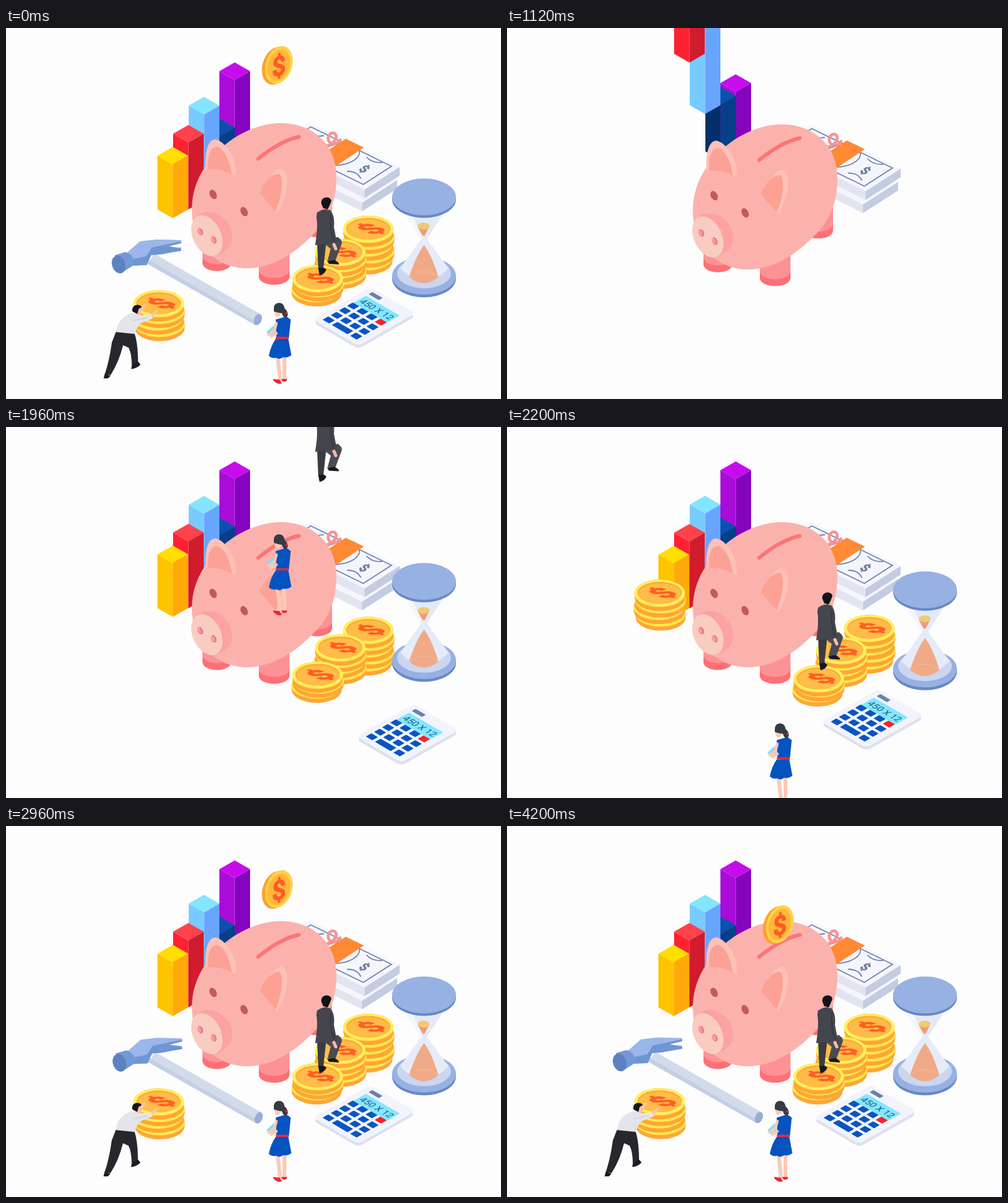
Animation of 791 by 593 pixels, one loop 4680 ms. Source, as an HTML page:

```html
<!DOCTYPE html>
<html lang="en">
<head>
<meta charset="utf-8">
<title>Savings</title>
<style>
html, body { margin: 0; width: 100%; height: 100%; overflow: hidden; background: #fdfdfe; }
svg { display: block; width: 791px; height: 593px; }
text { text-anchor: middle; font-family: Roboto, "Liberation Sans", sans-serif; font-weight: 700; }
</style>
</head>
<body>
<svg id="stage" viewBox="0 0 791 593"></svg>
<script>
const path = (fill, d) => `<path fill="${fill}" d="${d}"/>`;
const poly = (fill, pts) => `<polygon fill="${fill}" points="${pts}"/>`;
const line = (color, width, d) =>
  `<path fill="none" stroke="${color}" stroke-width="${width}" stroke-linecap="round" d="${d}"/>`;
const oval = (fill, x, y, rx, ry, turn = 0) =>
  `<ellipse fill="${fill}" rx="${rx}" ry="${ry}" transform="translate(${x} ${y}) rotate(${turn})"/>`;
const rect = (fill, x, y, w, h) => `<rect fill="${fill}" x="${x}" y="${y}" width="${w}" height="${h}" rx="1"/>`;
const dollar = (color, size, matrix, weight = 0) =>
  `<text fill="${color}" stroke="${color}" stroke-width="${weight}" font-size="${size}" y="${size * .36}"
    transform="matrix(${matrix})">$</text>`;

function bar(x, top, bottom, lid, left, right) {
  const m = x + 24.5, r = x + 49;
  return poly(left, [x, top + 14, m, top + 28, m, bottom, x, bottom - 14]) +
    poly(right, [m, top + 28, r, top + 14, r, bottom - 14, m, bottom]) +
    poly(lid, [m, top, r, top + 14, m, top + 28, x, top + 14]);
}

function stack(x, y, count, gap) {
  let s = '';
  for (let i = count - 1; i >= 0; i--) {
    const cx = x + (i ? (i % 2 ? 1.5 : -1.5) : 0), cy = y + i * gap;
    s += path('#ffa636', `M${cx - 40} ${cy}v8a40 21 0 0 0 80 0v-8z`) +
      oval('#ffe94f', cx, cy + 1.5, 40.5, 21) + oval('#ffa636', cx, cy - 1.5, 39, 19.5);
  }
  return s + oval('#fff05c', x, y, 40.5, 21) + oval('#ffa93a', x, y, 35.5, 17.5) +
    oval('#ffbc48', x, y + 1, 34, 16) +
    dollar('#ff5f24', 47, `.95 -.3 .87 .35 ${x + 4} ${y}`, 1.6);
}

function leg(x, r, y) {
  const tube = (fill, b) => path(fill, `M${x - r} ${y - 45}V${b}a${r} 12.5 0 0 0 ${2 * r} 0V${y - 45}z`);
  return tube('#fd7075', y) + tube('#fd9296', y - 11);
}

const slab = (dx, dy) => `<g transform="translate(${dx} ${dy})">` +
  poly('#e2e4f0', '430,187 573,258 573,272 430,201') +
  poly('#c3cce0', '573,258 629,222 629,236 573,272') +
  poly('#f5f6fc', '486,151 629,222 573,258 430,187') + '</g>';

const notes = slab(-4, 21) + slab(0, 0) +
  `<g fill="none" stroke="#7184b0" stroke-width="1.8">
    <path d="M487 158L616 221L571 250L442 187Z"/>
    <ellipse rx="32" ry="17" transform="translate(533 202) rotate(-8)"/>
    <path d="M576 206q8 10 25 9M545 229q17 0 22 12M484 167q8 8 24 5"/>
  </g>` +
  poly('#ff8934', '543,177 572,191 525,222 498,206') +
  dollar('#71809f', 21, '.87 .43 -.75 .6 573 225', .6);

const pig = leg(497, 24, 322) + leg(337, 23, 376) + leg(428.5, 24.5, 398) +
  line('#f9928f', 4.5, 'M513 188C521 187 532 176 526 169C520 164 512 173 516 181C521 188 529 186 534 179') +
  path('#fcb2ac', `M297 290C297 262 306 240 318 222C345 180 395 152 440 152C495 153 528 190 528 238
    C528 278 516 306 490 331C462 360 425 384 385 384C335 384 297 345 297 290Z`) +
  path('#fdc1b8', 'M319 226C317 200 322 179 334 178C350 180 371 210 367 237C352 228 335 222 319 226Z') +
  path('#fca196', 'M323 226C321 205 327 189 338 190C350 194 358 214 361 234C349 228 336 224 323 226Z') +
  path('#fdc1b6', 'M418 246C424 233 432 225 440 225C453 230 454 262 432 298Z') +
  path('#fca193', 'M406 264C412 246 425 232 437 233C445 243 440 270 431 293Z') +
  oval('#c25b58', 331, 266, 5.3, 8, -28) + oval('#c25b58', 380.5, 293.5, 5.3, 8, -28) +
  path('#fca2a2', 'M303 303C312 292 335 290 349 305C365 322 366 345 352 354Q345 361 336 364Z') +
  oval('#f9ccc2', 321, 332, 22.5, 34.5, -25) +
  oval('#ee7c80', 310.5, 325.5, 4.2, 6.4, -24) + oval('#ee7c80', 332, 338.5, 4.2, 6.4, -24) +
  oval('#f8a09c', 309, 325, 2.2, 5, -24) + oval('#f8a09c', 330.5, 338, 2.2, 5, -24) +
  line('#fb7577', 6, 'M403 209C424 192 448 178 468 174');

const hourglass = oval('#6888c4', 668, 400.5, 51, 30) + oval('#97b1e3', 668, 396, 51, 30) +
  oval('#cbd7f0', 668, 392, 43, 24) +
  path('#e6ecf7', 'M664 336L630 384Q668 425 707 384L672 336Z') +
  path('#f0aa88', 'M668 347Q680 362 691 398Q668 418 644 398Q656 362 668 347Z') +
  line('#f2bd9f', 1, 'M644 398Q668 380 691 398') +
  poly('#e3eaf6', '630,286 706,286 672,338 664,338') +
  poly('#f4f6fb', '630,286 644,286 666,338 664,338') +
  poly('#f09a78', '658,318 676,318 669,332 666,332') + oval('#f2ca72', 667.5, 316.5, 9.5, 5.5) +
  oval('#6888c4', 668, 274, 51, 29.5) + oval('#97b1e3', 668, 270, 51, 29.5);

let keys = '';
for (let r = 0; r < 4; r++)
  for (let c = 0; c < 4; c++) {
    if (r === 3 && c === 2) continue;
    const wide = r === 3 && c === 1;
    keys += rect(r === 0 && c === 3 ? '#f5222f' : '#0955c3', 6 + c * 17, 38 + r * 15, wide ? 29 : 12, 10.5);
  }
const iso = (x, y) => `transform="matrix(.864 .503 -.869 .495 ${x} ${y})"`;
const casing = (fill, y) =>
  `<rect x="-3" y="-3" width="83.5" height="105" rx="7" fill="${fill}" ${iso(582, y)}/>`;
const calculator = casing('#dce1ef', 422) + casing('#f3f4fb', 417) + `<g ${iso(582, 417)}>` +
  rect('#6b80ad', 7, 3, 19, 7) + rect('#82e7ff', 7, 15, 63, 23) + keys +
  `<text x="39" y="32" font-size="14.5" style="font-weight:400" fill="#24508c">450 X 12</text></g>`;

const woman =
  line('#fcc9b5', 6, 'M434 526L438 562M445 526L445 561') +
  path('#ee2733', 'M427 561L437 562L441 568Q434 571 427 563ZM440 561L449 561Q450 566 442 565Z') +
  path('#0552c1', 'M431 497L451 496L456 523Q449 528 443 526Q437 531 432 527Q425 529 420 524Q423 508 431 497Z') +
  path('#0552c1', 'M431 466L448 461L455 466L452 496H432Z') +
  rect('#f3283a', 431, 493.5, 21, 3.6) +
  poly('#84dff5', '416,486 428,475 431,487 421,492') +
  line('#fcc9b5', 4.5, 'M432 472L429 483L420 490M432 488L424 493') +
  oval('#fcc9b5', 434, 455, 5, 7) +
  path('#343b45', 'M428 448C428 437 444 436 445 448C452 454 452 462 446 463Q442 461 441 456Q433 455 428 453Z') +
  oval('#ee2733', 448, 456, 1.5, 2);

const climber =
  path('#3b3c43', 'M497 340H512L507 386H499Z') +
  path('#4a4b53', 'M505 342L530 334Q539 340 536 346L526 373L514 371L519 353Z') +
  path('#17181d', 'M499 384L507 383L512 386Q510 393 501 395ZM513 372L525 371Q533 375 532 378L516 377Z') +
  path('#44454d', 'M497 295Q509 287 518 291Q526 300 524 318L529 344L494 347Q499 318 496 302Z') +
  line('#383940', 2, 'M519 299Q517 320 524 340') +
  line('#f7b9a9', 5, 'M524 346L527 353') +
  oval('#f1b6a2', 515, 283, 5, 8) +
  path('#111217', 'M504 281C502 269 518 268 520 276L517 284L514 290L507 288Z');

const pusher =
  path('#27282d', `M176 485L205 487Q211 503 211 536L201 540Q201 521 196 511L187 507
    Q181 533 167 555L158 553Q166 528 169 503Z`) +
  path('#1b1c21', 'M158 552L167 556L163 560H156ZM201 540L211 533L215 538Q208 545 200 545Z') +
  line('#f9c1ab', 4.5, 'M214 455L221 444M231 461L240 453') +
  path('#e4e5eb', 'M178 475Q187 458 205 455L216 459L232 458L235 464L215 472Q209 478 206 489L176 486Z') +
  line('#cfd1da', 1.5, 'M203 468L226 463') +
  oval('#f9c1ab', 212, 452, 5, 7) +
  path('#16171c', 'M202 453C200 441 214 440 217 446L212 449L210 457Z');

const hammer =
  poly('#d2dbea', '237,361 406,457 399,475 226,377') +
  poly('#c4cfe2', '226,377 399,475 401,470 229,371') +
  oval('#98aed5', 402.5, 466, 6, 9.5, 22) +
  path('#9bb6e8', 'M190 362L214 341L240 338L280 339V344L258 349L280 351V356L246 362L232 363L225 378L203 378Z') +
  path('#6f95d3', 'M233 351L280 341V344L260 349L280 353V356L246 362L232 363L225 379L203 380L204 369L224 365Z') +
  path('#7298d6', 'M174 363L191 358Q207 364 204 379L184 392Z') +
  oval('#5d82bf', 180, 378, 10.5, 14.5, -18);

const coin = oval('#ffa12c', 431, 60.5, 21, 31, 18) + oval('#ffd246', 436, 59, 21, 31, 18) +
  oval('#ffb63c', 436, 59.5, 17, 26, 18) + dollar('#ff5c24', 43, '.9 -.25 0 1 436 60.5', 1);

// Each part: entrance time, offset it flies in from, drawing
const parts = [
  [718, 0, -293, notes],
  [815, 0, -248, bar(341, 55, 248, '#c60cec', '#a90cd8', '#8504bd')],
  [912, 0, -262, bar(317, 145, 262, '#0b50ae', '#032f6b', '#063f87')],
  [1009, 0, -276, bar(292, 110, 276, '#84e5ff', '#78cbff', '#68a5ff')],
  [1106, 0, -290, bar(267, 155, 290, '#ff424b', '#fc2233', '#d01c2c')],
  [1203, 0, -304, bar(242, 190, 304, '#ffde00', '#ffc400', '#ffa90a')],
  [548, 0, -411, pig],
  [1300, 0, -395, stack(579, 321, 5, 11)],
  [1397, 0, -418, stack(534, 358, 4, 10)],
  [1494, 0, -445, stack(498, 400, 3, 8)],
  [1663, 0, -431, hourglass],
  [1697, 426, 176, calculator],
  [1794, 0, -570, woman],
  [1891, 0, -395, climber],
  [1996, 0, -501, stack(244, 440, 4, 10.5)],
  [2093, -373, 152, pusher],
  [2197, 752, 255, hammer],
  [0, 0, 0, coin]
];

const stage = document.getElementById('stage');
stage.innerHTML = parts.map(p => `<g>${p[3]}</g>`).join('');
const groups = [...stage.children];
const coinGroup = groups.pop();
const clamp = (v, lo, hi) => Math.min(hi, Math.max(lo, v));

// Straight flight, then a damped swing around the resting place
function flyIn(age) {
  const q = age - 315;
  return q < 0 ? Math.max(0, age / 315) : 1 + .143 * Math.exp(-q / 123) * Math.sin(Math.PI * q / 142);
}

const LOOP = 4680, INTRO = 720, DROP = 2480, LAND = 4200;

function draw(now) {
  const t = now % LOOP, intro = t < INTRO;
  const clock = t + clamp((1500 - t) / 8, 0, 45);
  groups.forEach((g, i) => {
    const [start, dx, dy] = parts[i];
    const left = intro ? 0 : 1 - flyIn(clock - start);
    g.setAttribute('transform', `translate(${dx * left} ${dy * left})`);
  });
  const fall = intro ? 0 : 98 * Math.sin(clamp((t - DROP) / (LAND - DROP), 0, 1) * Math.PI / 2);
  coinGroup.setAttribute('transform', `translate(0 ${fall})`);
  coinGroup.setAttribute('opacity', intro ? 1 : clamp((t - DROP - 80) / 160, 0, 1));
}

const began = performance.now();
function tick() {
  draw(performance.now() - began);
  requestAnimationFrame(tick);
}
tick();
</script>
</body>
</html>
```
